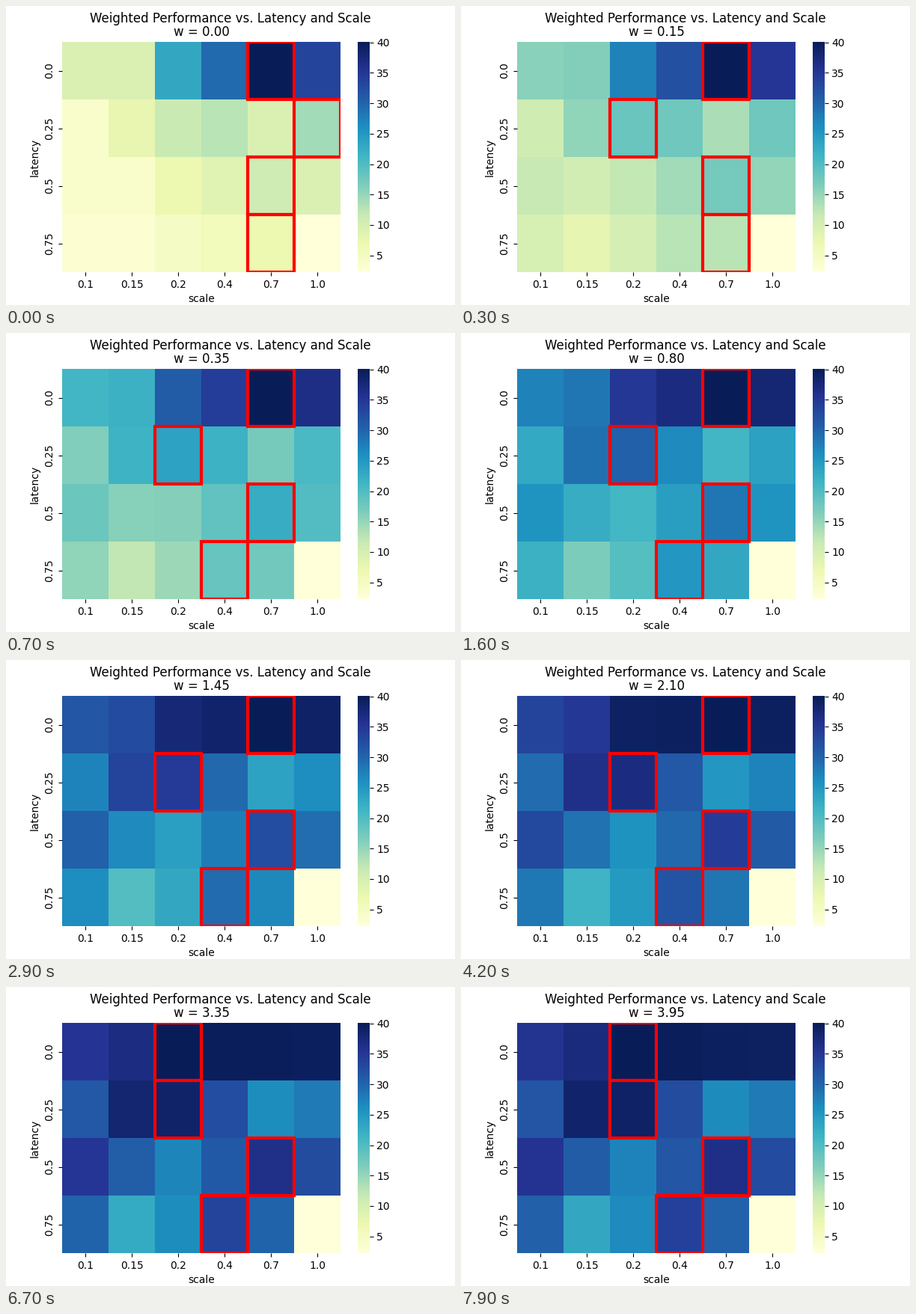
Recreate the animation shown at these times as a matplotlib script. Size 600 px wide and 400 px high, loop 8000 ms.

```python
import numpy as np
import matplotlib.pyplot as plt
from matplotlib.animation import FuncAnimation
from matplotlib.patches import Rectangle

FRAMES, INTERVAL = 80, 100
W_STEP, GAIN = 0.05, 1.8
VMIN, VMAX = 2.26, 40.08

scales = ["0.1", "0.15", "0.2", "0.4", "0.7", "1.0"]
latencies = ["0.0", "0.25", "0.5", "0.75"]
cols = np.arange(len(scales))


def wave(mean, amp, freq, peak):
    return mean + amp * np.cos(freq * (cols - peak))


def base_scores():
    """One curve over scale that fades with latency; the second row dips."""
    curve = np.interp(cols, [1, 2, 3, 4, 5], [7.1, 20.7, 27.2, 37.8, 31.3])
    fade = [1, 0.3, 0.23, 0.125]
    grid = VMIN + np.outer(fade, curve)
    grid[1] = np.interp(cols, [0, 2, 3, 4, 5], [4, 11.4, 12.7, 9.4, 14.2])
    return grid


# The weight w shifts each cell from its base score to its bonus score.
base = base_scores()
bonus = np.array([
    wave(41.2, 1.67, 1.45, 2.05),
    wave(36.4, 8, 1.1, 1.5),
    wave(35.3, 5, 1.5, 4.1),
    wave(32, 6.5, 1.6, 3.2),
])
base[-1, -1] = bonus[-1, -1] = VMIN  # the worst cell at every weight


def scores(w):
    """Weighted scores, rescaled to the full colour range."""
    raw = base + GAIN * w * bonus
    unit = (raw - raw.min()) / (raw.max() - raw.min())
    return VMIN + (VMAX - VMIN) * unit


fig, ax = plt.subplots(figsize=(6, 4), dpi=100)
fig.suptitle("Weighted Performance vs. Latency and Scale")

mesh = ax.pcolormesh(scores(0), cmap="YlGnBu", vmin=VMIN, vmax=VMAX)
ax.set(xlim=(0, len(scales)), ylim=(len(latencies), 0),
       xlabel="scale", ylabel="latency")
ax.set_xticks(cols + 0.5, scales)
ax.set_yticks(np.arange(len(latencies)) + 0.5, latencies,
              rotation=90, va="center")
ax.spines[:].set_visible(False)

bar = fig.colorbar(mesh, ax=ax)
bar.outline.set_linewidth(0)

title = ax.set_title("w = 0.00")
boxes = [
    ax.add_patch(Rectangle((0, row), 1, 1, fill=False, edgecolor="red", lw=3))
    for row in range(len(latencies))
]


def update(i):
    w = i * W_STEP
    values = scores(w)
    mesh.set_array(values)
    title.set_text(f"w = {w:.2f}")
    for box, col in zip(boxes, values.argmax(axis=1)):
        box.set_x(col)
    return [mesh, title, *boxes]


anim = FuncAnimation(fig, update, frames=FRAMES, interval=INTERVAL,
                     repeat=True, repeat_delay=0)
plt.show()
```
